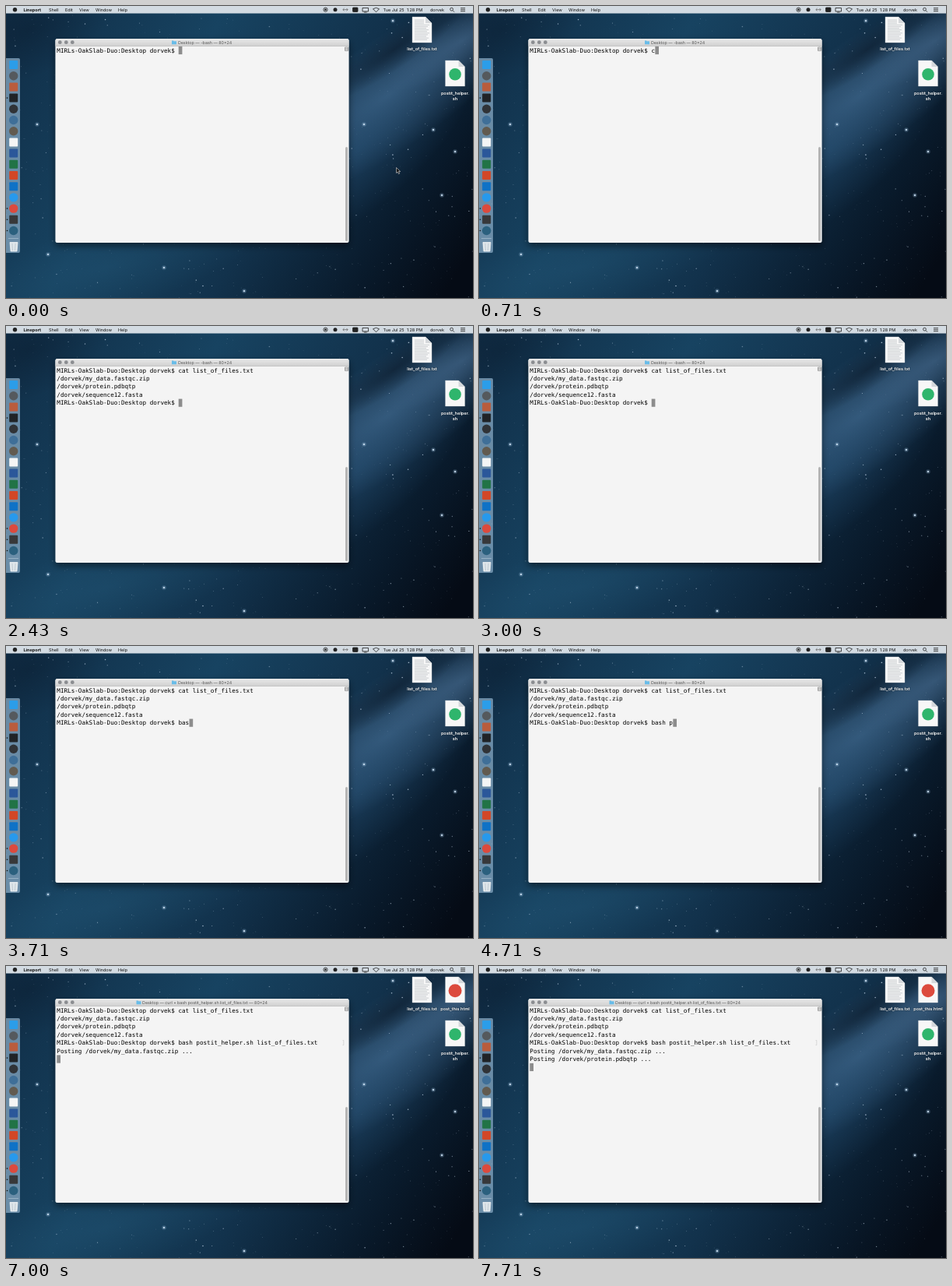
An HTML page with a canvas that plays this animation: 600 by 375 pixels, repeating every 8000 ms.

```html
<!DOCTYPE html>
<html lang="en">
<head>
<meta charset="utf-8">
<title>Desktop shell session</title>
<style>
  html, body { margin: 0; width: 100%; height: 100%; overflow: hidden; background: #0f2c44; }
  canvas, svg { position: absolute; left: 0; top: 0; width: 600px; height: 375px; }
  text { font-family: Inter, Roboto, sans-serif; font-size: 5.5px; white-space: pre; text-rendering: geometricPrecision; }
  .mono text { font-family: "DejaVu Sans Mono", "Noto Sans Mono", monospace; font-size: 7.64px; fill: #000; }
  .label text { font-weight: 600; fill: #fff; text-anchor: middle; paint-order: stroke; stroke: #0a1c2c88; stroke-width: .8px; }
  #title { font-size: 5.35px; fill: #555; text-anchor: middle; }
</style>
</head>
<body>
<canvas id="sky" width="600" height="375"></canvas>
<svg viewBox="0 0 600 375">
  <defs>
    <linearGradient id="bar" x2="0" y2="1"><stop stop-color="#e9e9e9"/><stop offset="1" stop-color="#d0d0d0"/></linearGradient>
    <filter id="shadow" x="-10%" y="-10%" width="120%" height="125%">
      <feDropShadow dx="0" dy="4" stdDeviation="5" flood-opacity=".5"/>
    </filter>
    <g id="page">
      <path d="M0 0H17L25 8V33H0Z" fill="#f7f7f7" stroke="#c8ccd0" stroke-width=".4"/>
      <path d="M17 0V8H25Z" fill="#d5d8db"/>
    </g>
  </defs>

  <rect width="600" height="9.5" fill="#d3dbe2"/>
  <circle cx="11.5" cy="4.7" r="2.7" fill="#222"/>
  <g id="menu" fill="#111"></g>
  <g fill="none" stroke="#222" stroke-width=".8">
    <circle cx="410.5" cy="4.7" r="2.6"/><circle cx="410.5" cy="4.7" r="1" fill="#222"/>
    <circle cx="423" cy="4.7" r="2.5" fill="#222" stroke="none"/>
    <path d="M433 4.7h6M434.5 3l-1.7 1.7 1.7 1.7M437.5 3l1.7 1.7-1.7 1.7" stroke="#666"/>
    <rect x="445.5" y="2" width="6.5" height="5.5" rx=".8" fill="#222"/>
    <path d="M458 2.5h7.5v4.5h-7.5zM460 8h3.5"/>
    <path d="M471.5 3.8q4-3 8 0l-4 4z"/>
    <circle cx="572.5" cy="4.2" r="1.9"/><path d="M574 5.7l2 2"/>
    <path d="M584 2.7h6M584 4.7h6M584 6.7h6"/>
  </g>

  <rect x="-2" y="67" width="20" height="250" rx="2" fill="#7d9fba" opacity=".82"/>
  <g id="dock"></g>
  <path d="M3 298.5H16" stroke="#c4d4e0" stroke-width=".5"/>
  <path d="M5 303.5H15L14 315H6Z" fill="#dfe6ea" stroke="#f8f8f8" stroke-width=".7"/>
  <path d="M8 305l.5 9M12 305l-.5 9" stroke="#aab8c2" stroke-width=".6"/>

  <use href="#page" x="522" y="14"/>
  <path id="scribble" stroke="#aab0b5" stroke-width=".6"/>
  <use href="#page" x="564.5" y="70"/>
  <circle cx="577" cy="87.7" r="7.8" fill="#2fb56c"/>
  <g class="label">
    <text x="534.5" y="57">list_of_files.txt</text>
    <text x="577" y="114">postit_helper.</text>
    <text x="577" y="121">sh</text>
  </g>
  <g id="htmlFile" class="label">
    <use href="#page" x="564.5" y="14"/>
    <circle cx="577" cy="31.7" r="8.5" fill="#dc4a3d"/>
    <text x="577" y="57">post_this.html</text>
  </g>

  <g filter="url(#shadow)"><rect x="63.5" y="42" width="377" height="262" rx="2.5" fill="#f4f4f4"/></g>
  <path d="M63.5 51.5V44.5a2.5 2.5 0 0 1 2.5-2.5H438a2.5 2.5 0 0 1 2.5 2.5V51.5Z" fill="url(#bar)"/>
  <path d="M63.5 51.5H440.5" stroke="#b4b4b4" stroke-width=".6"/>
  <g fill="#8b8d91"><circle cx="69.3" cy="46.7" r="2.4"/><circle cx="77.3" cy="46.7" r="2.4"/><circle cx="85.3" cy="46.7" r="2.4"/></g>
  <path id="folder" d="M0 44.5h2l.8.8h3.2v4H0z" fill="#68bce8"/>
  <text id="title" x="255.5" y="48.7"></text>
  <path d="M435.5 53h4v4.5h-4zM435.5 55.2h4" fill="#ddd" stroke="#777" stroke-width=".6"/>
  <rect x="436" y="181" width="3" height="121" rx="1.5" fill="#b5b5b5"/>
  <path id="mark" d="M432.5 95.5h1.3v6h-1.3" fill="none" stroke="#bbb" stroke-width=".5"/>
  <g class="mono">
    <rect id="cursor" width="4.7" height="10.2" fill="#8c8c8c"/>
    <g id="lines"></g>
  </g>
  <path id="pointer" d="M501.5 207.5v7l1.7-1.5 1.2 2.7 1.3-.6-1.2-2.6h2.2z" fill="#111" stroke="#ddd" stroke-width=".6"/>
</svg>
<script>
const $ = id => document.getElementById(id);
const LOOP = 8000, CHAR = 4.6, ROW = 10.42, LEFT = 65.3, TOP = 51.9;
const PROMPT = "MIRLs-OakSlab-Duo:Desktop dorvek$ ";
const FILES = ["/dorvek/my_data.fastqc.zip", "/dorvek/protein.pdbqtp", "/dorvek/sequence12.fasta"];
const CAT = "cat list_of_files.txt ", BASH = "bash postit_helper.sh list_of_files.txt ";

// [time, number of characters on the command line]; jumps are tab completions
const catTyping = [[710, 1], [860, 2], [1000, 3], [1140, 4], [1290, 5], [1430, 6], [1570, CAT.length]];
const bashTyping = [[3430, 1], [3570, 2], [3710, 3], [4000, 4], [4290, 5], [4570, 6], [4860, 7],
  [5290, 22], [6000, 23], [6140, 24], [6430, BASH.length]];
const CAT_RUN = 2000, BASH_RUN = 6710, SECOND_POST = 7430;

const typed = (command, steps, t) =>
  command.slice(0, steps.reduce((count, [at, n]) => t >= at ? n : count, 0));

function screenAt(t) {
  const rows = [PROMPT + typed(CAT, catTyping, t)];
  if (t >= CAT_RUN) rows.push(...FILES, PROMPT + typed(BASH, bashTyping, t));
  if (t >= BASH_RUN) {
    rows.push(`Posting ${FILES[0]} ...`);
    if (t >= SECOND_POST) rows.push(`Posting ${FILES[1]} ...`);
    rows.push("");
  }
  return rows;
}

function random(seed) {
  return () => (seed = seed * 16807 % 2147483647) / 2147483647;
}

function paintSky() {
  const c = $("sky").getContext("2d"), rnd = random(4217);
  const base = c.createLinearGradient(0, 20, 560, 375);
  [[0, "#102d46"], [.35, "#174361"], [.62, "#12324c"], [.85, "#091a2b"], [1, "#050b15"]]
    .forEach(stop => base.addColorStop(...stop));
  c.fillStyle = base;
  c.fillRect(0, 0, 600, 375);

  const glow = (x, y, rx, ry, angle, rgb, alpha) => {
    c.save();
    c.translate(x, y);
    c.rotate(angle);
    c.scale(rx, ry);
    const g = c.createRadialGradient(0, 0, 0, 0, 0, 1);
    g.addColorStop(0, `rgba(${rgb},${alpha})`);
    g.addColorStop(1, `rgba(${rgb},0)`);
    c.fillStyle = g;
    c.fillRect(-1, -1, 2, 2);
    c.restore();
  };
  glow(490, 115, 230, 70, -.6, "82,124,164", .6);
  glow(450, 185, 190, 75, -.7, "40,84,122", .5);
  glow(585, 45, 110, 32, -.55, "85,125,165", .4);
  glow(500, 55, 120, 24, -.6, "9,24,40", .6);
  glow(130, 335, 200, 55, -.25, "34,84,116", .45);
  glow(30, 30, 110, 60, -.4, "8,22,38", .35);

  const dot = (x, y, r, alpha) => {
    c.fillStyle = `rgba(215,232,248,${alpha})`;
    c.beginPath();
    c.arc(x, y, r, 0, 7);
    c.fill();
  };
  for (let i = 0; i < 750; i++) dot(rnd() * 600, rnd() * 375, .25 + rnd() ** 4 * .6, .25 + rnd() * .5);
  for (const [x, y] of [[203, 336], [460, 152], [577, 187], [306, 366], [54, 319], [560, 243], [497, 19], [40, 152], [549, 159]]) {
    glow(x, y, 3.5, 3.5, 0, "170,205,235", .6);
    dot(x, y, 1.1, .95);
  }
}

function buildStaticParts() {
  const menu = [[22.5, "Lineport", 700], [55, "Shell"], [76, "Edit"], [94, "View"], [115, "Window"], [144, "Help"],
    [484.5, "Tue Jul 25  1:28 PM"], [545, "dorvek"]];
  $("menu").innerHTML = menu.map(([x, label, weight = 400]) =>
    `<text x="${x}" y="6.7" font-weight="${weight}">${label}</text>`).join("");

  // s = square, c = circle
  const icons = ["s#2b9de9", "c#55595d", "s#b95c3d", "s#202326", "c#303337", "c#3f6f98", "c#625b50", "s#f4f5f5",
    "s#2b579a", "s#217346", "s#d24726", "s#0f72c6", "c#2799ec", "c#dc4a3d", "s#37383a", "c#2b607e"];
  const running = [3, 13, 14, 15];
  $("dock").innerHTML = icons.map((icon, i) => {
    const y = 75.5 + i * 14.2, color = icon.slice(1);
    const shape = icon[0] === "c"
      ? `<circle cx="9.7" cy="${y}" r="5.7" fill="${color}"/>`
      : `<rect x="4.2" y="${y - 5.5}" width="11" height="11" rx="1" fill="${color}"/>`;
    return shape + (running.includes(i) ? `<circle cx="1.5" cy="${y}" r=".8" fill="#111"/>` : "");
  }).join("");

  let path = "";
  for (let i = 0; i < 13; i++) path += `M525 ${18 + i * 2.1}h${i < 3 ? 12 : 15 + i * 3 % 5}`;
  $("scribble").setAttribute("d", path);
  for (let i = 0; i < 7; i++) {
    const line = document.createElementNS("http://www.w3.org/2000/svg", "text");
    line.setAttribute("x", LEFT);
    line.setAttribute("y", TOP + 7.6 + i * ROW);
    $("lines").append(line);
  }
}

const show = (id, visible) => $(id).setAttribute("visibility", visible ? "visible" : "hidden");

function draw() {
  const t = performance.now() % LOOP, rows = screenAt(t), posting = t >= BASH_RUN;
  [...$("lines").children].forEach((line, i) => line.textContent = rows[i] || "");
  $("cursor").setAttribute("x", LEFT + rows.at(-1).length * CHAR);
  $("cursor").setAttribute("y", TOP + (rows.length - 1) * ROW);
  $("title").textContent = posting
    ? "Desktop — curl • bash postit_helper.sh list_of_files.txt — 80×24"
    : "Desktop — -bash — 80×24";
  $("folder").setAttribute("transform", `translate(${posting ? 167.5 : 213})`);
  show("htmlFile", posting);
  show("mark", posting);
  show("pointer", t < catTyping[0][0]);
  requestAnimationFrame(draw);
}

paintSky();
buildStaticParts();
draw();
</script>
</body>
</html>
```
